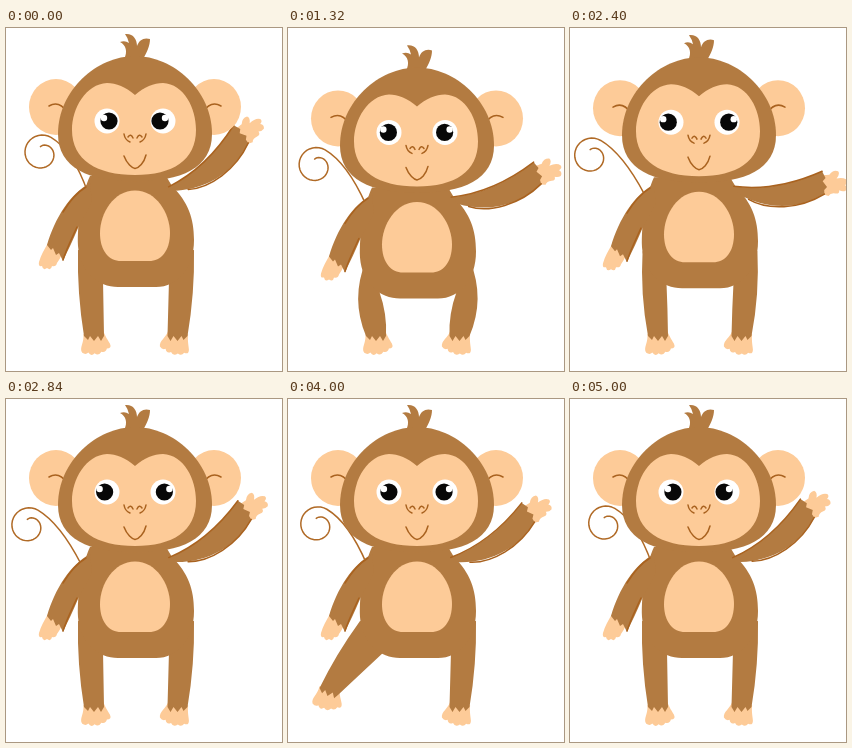
Animation of 276x343 px, one loop 5.04 s. Source, as an HTML page:

```html
<!DOCTYPE html>
<html lang="en">
<head>
<meta charset="utf-8">
<title>Waving monkey</title>
<style>
html, body { margin: 0; height: 100%; overflow: hidden; background: #fff; }
svg { display: block; width: 100vw; height: 100vh; }
.fur { fill: #b37b41; }
.skin { fill: #fdcb98; }
.line { fill: none; stroke: #a9621f; stroke-width: 1.5; stroke-linecap: round; stroke-linejoin: round; }
</style>
</head>
<body>
<svg viewBox="0 0 276 343">
  <defs>
    <path id="foot" class="skin" d="M-10,-4 C-11,5 -17,8 -15,14 Q-12,17 -9,15 Q-7,20 -3,17 Q0,21 4,17 Q8,19 10,15 Q15,16 14,11 C13,7 11,4 10,-4 Z"/>
    <path id="hand" class="skin" d="M-4,-9 Q3,-9 5,-9 Q9,-14 14,-12 Q16,-9 12,-5 Q20,-6 23,-2 Q24,1 20,2 Q23,5 20,8 Q17,9 14,7 Q14,11 10,10 Q5,9 3,12 L-3,10 Z"/>
  </defs>
  <path id="tail" class="line" style="stroke:#b06a26"/>
  <use id="footL" href="#foot"/>
  <use id="footR" href="#foot"/>
  <path id="legL" class="fur"/>
  <path id="legR" class="fur"/>
  <g id="torso">
    <path class="fur" d="M84,148 C76,165 71,195 72,218 C74,244 92,259 112,259 H150 C172,259 188,240 188,212 C188,190 182,174 166,158 L160,148 Z"/>
    <path class="skin" d="M129,162.500 C150,162.500 164,185 164,205 C164,223 155,233 143,233 H115 C103,233 94,223 94,205 C94,185 108,162.500 129,162.500 Z"/>
    <path class="skin" d="M42,215 C38,222 35,227 33,234 Q32,239 36,238 Q37,243 41,240 Q45,243 46,238 Q50,239 51,235 Q54,231 56,226 Z"/>
    <path class="fur" d="M84,155 C64,166 49,190 41,217 L45,222 L47,220 L50,227 L53,225 L57,233 C62,222 68,210 72,200 L86,174 Z"/>
    <path class="line" d="M80,159 C70,165 63,174 57,184 M57,232 C60,222 66,210 71,199"/>
    <g id="arm">
      <use href="#hand" x="89"/>
      <path class="fur" d="M-2,-3 C30,3 58,-2 87,-13 L90,-6 L87,-3 L91,3 L88,6 L88,10 C62,24 30,23 2,5 Z"/>
      <path class="line" d="M-2,-3 C30,3 58,-2 87,-13 M88,10 C62,24 30,23 12,11"/>
    </g>
    <ellipse class="skin" cx="50" cy="79" rx="27" ry="28"/>
    <ellipse class="skin" cx="208" cy="79" rx="27" ry="28"/>
    <path class="line" d="M43,78 Q53,72 61,84 M215,78 Q205,72 197,84"/>
    <path class="fur" d="M118,31 C122,24 120,17 114,14 Q119,12 123,15 Q122,10 119,6 C127,5 131,11 131,18 C133,12 138,9 144,11 C144,18 141,24 137,31 Z"/>
    <path class="fur" d="M129,28 C167,28 206,62 206,106 C206,140 175,153.500 129,153.500 C83,153.500 52,140 52,106 C52,62 91,28 129,28 Z"/>
    <path class="skin" d="M129,67 C120,59 110,55 101,55 C80,56 66,80 66,102 C66,132 91,147 129,147 C167,147 190,132 190,102 C190,80 178,56 157,55 C148,55 138,59 129,67 Z"/>
    <circle cx="101" cy="93" r="12.500" fill="#fff"/>
    <circle cx="157" cy="93" r="12.500" fill="#fff"/>
    <g id="pupilL"><circle r="8.600" fill="#080808"/><circle cx="-5" cy="-3" r="3.200" fill="#fff"/></g>
    <g id="pupilR"><circle r="8.600" fill="#080808"/><circle cx="5" cy="-3" r="3.200" fill="#fff"/></g>
    <path class="line" d="M118,106 Q119,112 124,114 M122,109 Q125,105 127,110 M140,106 Q139,112 134,114 M136,109 Q133,105 131,110 M118,128 C121,136 126,140 129,140.500 C133,140 138,135 140,127"/>
  </g>
</svg>
<script>
const LOOP = 5040, STEP = 40, TAU = Math.PI * 2;
const set = (id, name, value) => document.getElementById(id).setAttribute(name, value);
const move = (id, x, y) => set(id, "transform", `translate(${x} ${y})`);
const mix = (a, b, k) => a + (b - a) * k;
const clamp = v => Math.max(0, Math.min(1, v));
const triangle = v => 1 - Math.abs(2 * (v - Math.floor(v)) - 1);

// Five waves per loop at a slightly uneven tempo: 0 is raised, 1 is lowered.
function wave(x) {
  const drift = 0.05 * (1 - Math.cos(TAU * x)) - 0.08 * Math.sin(TAU * x);
  return triangle(5 * x + drift);
}

// A stalk that ends in a spiral.
function tail(sway) {
  const cx = mix(36, 21, sway), cy = mix(125, 127, sway);
  const curl = [];
  for (let k = 0; k <= 1; k += 1 / 40) {
    const a = -TAU / 6 - k * TAU * 1.15, r = 18 - 12 * k * k;
    curl.push([cx + r * Math.cos(a), cy + r * Math.sin(a)]);
  }
  const [x, y] = curl[0];
  set("tail", "d", `M${mix(82, 74, sway)},165Q${x + 22},${y + 13} ${curl.join("L")}`);
  set("tail", "stroke-width", mix(4.4, 3, sway));
}

// side is -1 for the left leg and 1 for the right one.
function leg(name, side, x, y, tilt, bob) {
  const r = tilt * Math.PI / 180;
  const at = (u, v) => [
    x + side * u * Math.cos(r) - v * Math.sin(r),
    y + side * u * Math.sin(r) + v * Math.cos(r)];
  const hip = (u, v) => [130 + side * u, v + bob];
  const bend = (a, b, out) => [(a[0] + b[0]) / 2 + side * out, (a[1] + b[1]) / 2];

  const outer = hip(58 - bob / 2, 222), inner = hip(33 + bob / 2, 252);
  const heel = at(10, 0), toe = at(-10, 0);
  const cuff = [[6, 4], [4, 0], [0, 5], [-4, 0], [-7, 5]].map(c => at(...c)).join("L");
  set("leg" + name, "d",
    `M${outer}Q${bend(outer, heel, 4 + bob)} ${heel}L${cuff}L${toe}` +
    `Q${bend(inner, toe, -bob * 0.4)} ${inner}L${hip(22, 225)}Z`);
  set("foot" + name, "transform", `translate(${x} ${y}) rotate(${tilt + side * 12})`);
}

function draw(t) {
  const x = t / LOOP;
  const bob = x < 0.5 ? 12 * triangle(2 * x) : 0;
  const sway = triangle(x);
  const kick = 40 * clamp(Math.min((t - 2880) / 1040, (5000 - t) / 1080));
  const swing = kick * Math.PI / 180;

  move("torso", 0, bob);
  move("tail", 0, bob);
  tail(sway);
  set("arm", "transform", `translate(166 160) rotate(${mix(-37, -1, wave(x))})`);
  move("pupilL", mix(103, 98, sway), 93);
  move("pupilR", mix(154, 159, sway), 93);
  leg("L", -1, 88 - 78 * Math.sin(swing), 230 + 78 * Math.cos(swing), kick * 0.5, bob);
  leg("R", 1, 171.5, 308, 0, bob);
}

const start = performance.now();
function tick() {
  const t = (performance.now() - start) % LOOP;
  draw(Math.floor(t / STEP) * STEP);
  requestAnimationFrame(tick);
}
tick();
</script>
</body>
</html>
```
